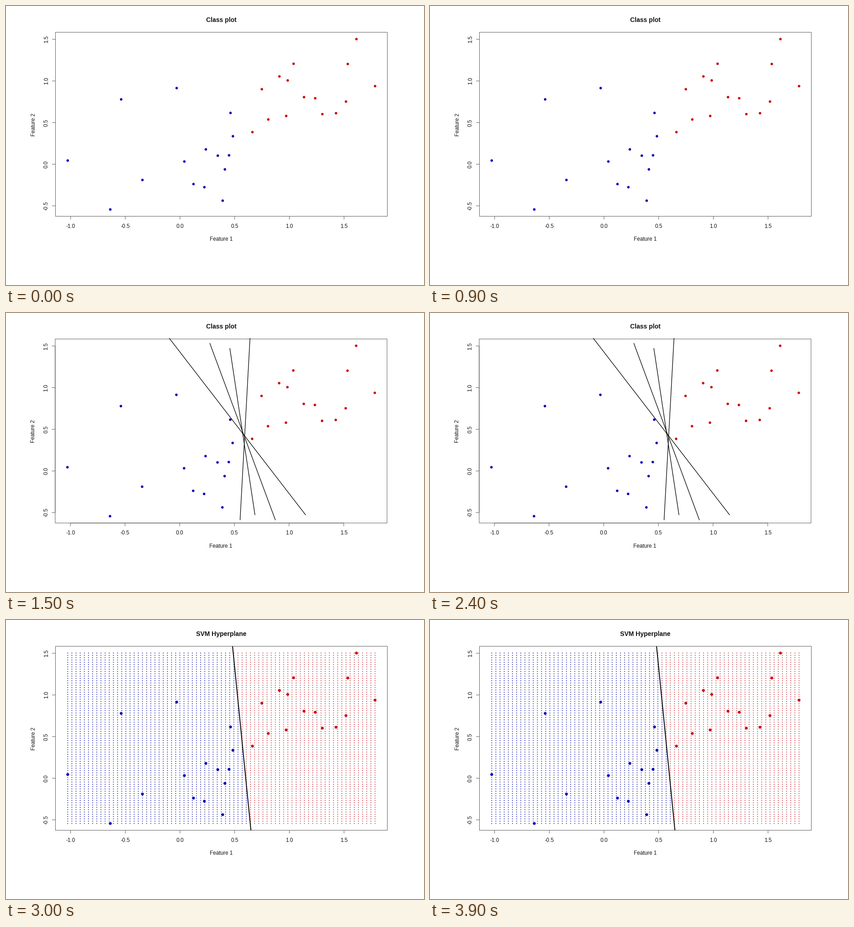
Write a matplotlib script that moves like this. It is 917 px wide and 611 px high and loops after 4.5 s.

```python
import numpy as np
import matplotlib.pyplot as plt
from matplotlib.animation import FuncAnimation

W, H, DPI = 917, 611, 100
PT = 72 / DPI  # points per pixel
BLUE, RED, FRAME = "#0505b8", "#cc0a10", "#5c5c5c"
LEFT, RIGHT, TOP, BOTTOM = 108.5, 836.5, 57.5, 460.5
SHIFT = 0.6  # the second scene sits slightly up and to the left

BLUE_POINTS = [
    (135.4, 338.4), (228.8, 445.6), (252.7, 204.5), (299.3, 381),
    (374.4, 179.8), (391.3, 340.6), (411.3, 390), (435.2, 396.8),
    (438.4, 314), (464.6, 327.8), (475.3, 426.3), (480.2, 357.8),
    (489.3, 327), (492.5, 234.2), (497.8, 285.2),
]
RED_POINTS = [
    (540.6, 276.2), (561.2, 182.2), (575.4, 248.5), (599.8, 154.2),
    (614.7, 240.8), (618, 163), (630.9, 126.5), (653.8, 199.6),
    (678.3, 202), (694, 236.8), (724, 234.8), (745.8, 209.3),
    (749.8, 127), (768.8, 72.4), (809.6, 175.5),
]
CANDIDATES = [
    ((358, 55), (657.5, 442.5)),
    ((447, 66), (591, 453.5)),
    ((491, 77), (546.2, 442.5)),
    ((535.3, 55), (513.5, 453.5)),
]
PLANE = ((497, TOP), (537.3, BOTTOM))

fig = plt.figure(figsize=(W / DPI, H / DPI), dpi=DPI, facecolor="white")
ax = fig.add_axes([0, 0, 1, 1])
ax.axis("off")
plt.rcParams["font.family"] = "Liberation Sans"


def segment(a, b, color, width, z=1):
    return ax.plot(*zip(a, b), color=color, lw=width * PT, zorder=z,
                   snap=False, solid_capstyle="butt")[0]


def label(x, y, text, size=11.7, **kw):
    return ax.text(x, y, text, fontsize=size * PT, ha="center",
                   va="baseline", rotation_mode="anchor", color="#111111", **kw)


def dots(points, colors, diameter, z):
    x, y = np.transpose(points)
    return ax.scatter(x, y, s=(diameter * PT) ** 2, c=colors, linewidths=0,
                      zorder=z)


def draw_axes():
    corners = [(LEFT, TOP), (RIGHT, TOP), (RIGHT, BOTTOM), (LEFT, BOTTOM)]
    ax.add_patch(plt.Polygon(corners, fill=False, ec=FRAME, lw=PT, snap=False,
                             joinstyle="miter", zorder=1))
    for i in range(6):
        x = 141.8 + 119.95 * i
        segment((x, BOTTOM), (x, BOTTOM + 7), FRAME, 1)
        label(x, 486, f"{-1 + i / 2:.1f}")
    for i in range(5):
        y = 437.7 - 91.2 * i
        segment((LEFT, y), (LEFT - 7.5, y), FRAME, 1)
        label(92, y, f"{-0.5 + i / 2:.1f}", rotation=90)
    segment((141.8, BOTTOM), (741.5, BOTTOM), FRAME, 1)
    segment((LEFT, 437.7), (LEFT, 72.9), FRAME, 1)
    label(472, 514.5, "Feature 1")
    label(64, 259.5, "Feature 2", rotation=90)


def draw_grid():
    x, y = np.meshgrid(np.linspace(135.4, 809.6, 75),
                       np.linspace(72.4, 445.6, 75))
    (x0, y0), (x1, y1) = PLANE
    edge = x0 + (y - y0) * (x1 - x0) / (y1 - y0)
    colors = np.where(x < edge, "#2424b4", "#cc3540").ravel()
    return dots(np.column_stack([x.ravel(), y.ravel()]), colors, 2, 2)


draw_axes()
title = label(472.5, 35, "", 14, weight="bold")
points = dots(BLUE_POINTS + RED_POINTS,
              [BLUE] * len(BLUE_POINTS) + [RED] * len(RED_POINTS), 5.6, 3)
candidates = [segment(np.add(a, SHIFT), np.add(b, SHIFT), "black", 1.3, 4)
              for a, b in CANDIDATES]
plane = [draw_grid(), segment(*PLANE, "black", 1.9, 4)]


def update(scene):
    shift = SHIFT if scene == 1 else 0
    ax.set_xlim(shift, W + shift)
    ax.set_ylim(H + shift, shift)
    title.set_text("SVM Hyperplane" if scene == 2 else "Class plot")
    points.set_sizes([((6.3 if scene == 2 else 5.6) * PT) ** 2])
    for line in candidates:
        line.set_visible(scene == 1)
    for part in plane:
        part.set_visible(scene == 2)
    return []


anim = FuncAnimation(fig, update, frames=3, interval=1500, repeat=True,
                     repeat_delay=0, init_func=lambda: update(0))
plt.show()
```
